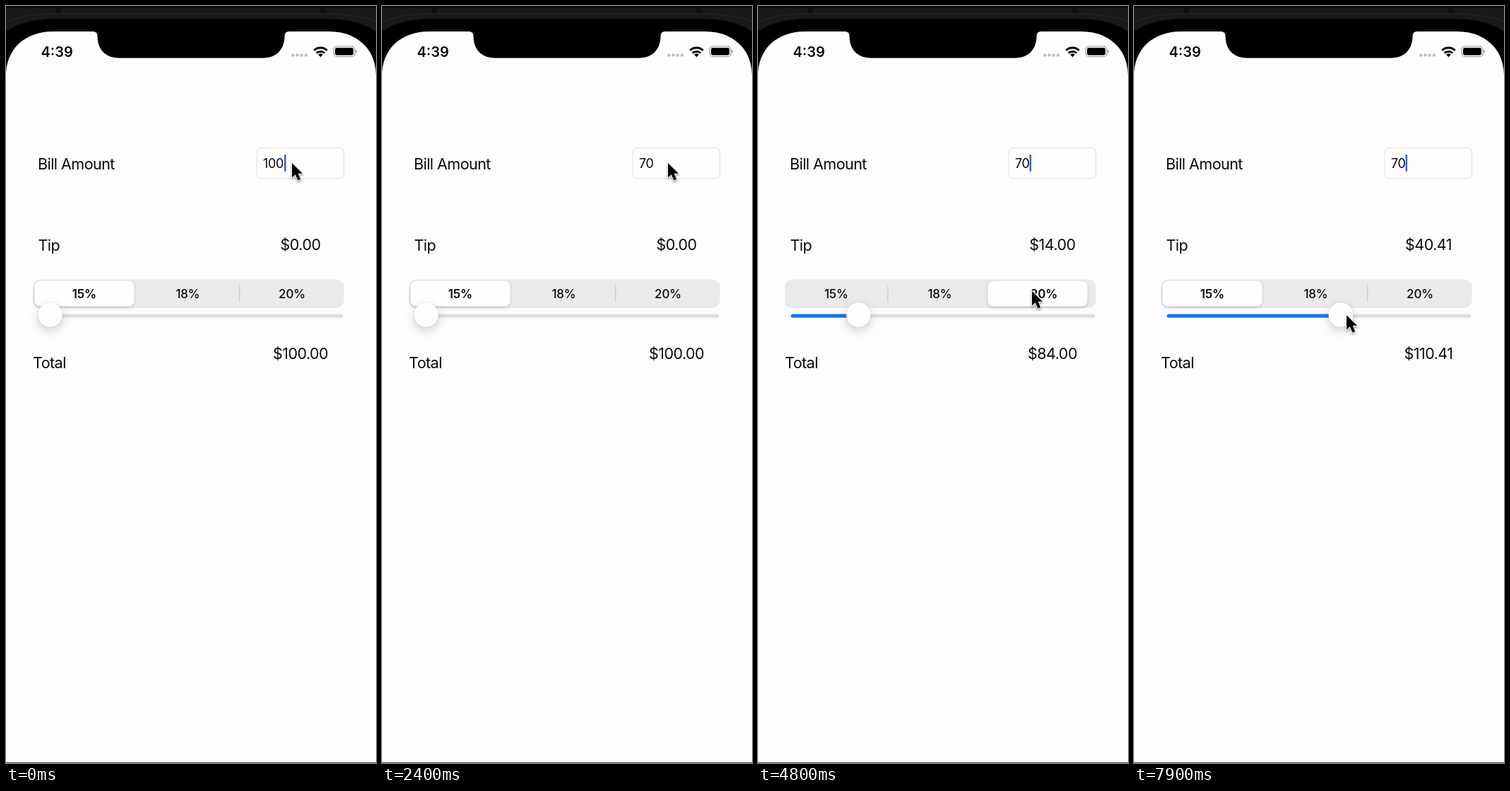
An HTML page for the animation above (8 s loop, 524x1070 px).

```html
<!DOCTYPE html>
<html lang="en">
<head>
<meta charset="utf-8">
<title>Tip calculator</title>
<style>
  html, body { margin: 0; width: 100%; height: 100%; overflow: hidden; background: #fefcfe; }
  svg { display: block; width: 100%; height: 100%; }
  text { font: 400 21.5px Inter, "Liberation Sans", sans-serif; letter-spacing: -.025em; fill: #0b0a0c; }
  .time { font-size: 20px; font-weight: 600; letter-spacing: 0; }
  .field { font-size: 18px; letter-spacing: -.02em; }
  .mid { text-anchor: middle; }
  .segment { font-size: 17px; font-weight: 500; letter-spacing: -.01em; text-anchor: middle; }
  .segment.on { font-weight: 600; }
  .pill { filter: drop-shadow(0 2px 2px rgba(0, 0, 0, .17)); }
  .thumb { filter: drop-shadow(0 5px 7px rgba(0, 0, 0, .17)) drop-shadow(0 0 1px rgba(0, 0, 0, .12)); }
  .arrow { filter: drop-shadow(0 2px 1.5px rgba(0, 0, 0, .35)); }
</style>
</head>
<body>
<svg viewBox="0 0 524 1070" preserveAspectRatio="none">
  <!-- phone body -->
  <rect width="524" height="1070" fill="#19181b"/>
  <rect width="524" height="3" fill="#0d0c0e"/>
  <path d="M70 3h8v8h-8zM445 3h8v8h-8z" fill="#0f0e11"/>
  <path d="M0 22Q30 11 70 11H454Q494 11 524 22" fill="none" stroke="#29282b"/>
  <path d="M0 36Q26 18 70 18H454Q498 18 524 36V110H0Z"/>
  <path fill="#fefcfe" d="M0 1069V98C0 62 26 36 66 36H123Q129.500 36 129.500 43C129.500 62 142 73.500 160 73.500H364C382 73.500 394.500 62 394.500 43Q394.500 36 401 36H458C498 36 524 62 524 98V1069Z"/>
  <rect y="1069" width="524" height="1" fill="#49484b"/>

  <!-- status bar -->
  <text class="time" x="49.500" y="72">4:39</text>
  <path d="M406.200 69.500h20" stroke="#bfbdc0" stroke-width="4.500" stroke-linecap="round" stroke-dasharray="0 6.200"/>
  <g fill="none" stroke="#000" stroke-width="3">
    <path d="M436.300 62.800a13 13 0 0 1 18.400 0"/>
    <path d="M439.700 66.500a8.300 8.300 0 0 1 11.600 0"/>
  </g>
  <path d="M445.500 72.200l-3.300-3.500a4.700 4.700 0 0 1 6.600 0Z"/>
  <rect x="464" y="57" width="30" height="14.500" rx="4.500" fill="none" stroke="#959397" stroke-width="1.200"/>
  <rect x="466" y="59" width="26" height="10.500" rx="2.700"/>
  <path d="M495.300 62q2 .5 2 2.300t-2 2.300Z" fill="#959397"/>

  <!-- form -->
  <text x="45" y="230.500">Bill Amount</text>
  <text x="45.500" y="346">Tip</text>
  <text x="38" y="511.500">Total</text>
  <rect x="355.500" y="200.500" width="123" height="43" rx="6" fill="#fffeff" stroke="#e4e2e8" stroke-width="1.200"/>
  <text class="field" id="bill" x="364" y="228.500"></text>
  <rect id="caret" y="210" width="2.600" height="24" rx="1" fill="#3d64da"/>
  <text class="mid" id="tip" x="417" y="344.500"></text>
  <text class="mid" id="total" x="417" y="498.800"></text>

  <rect x="38" y="386.500" width="440.500" height="40.500" rx="10" fill="#ebe9ec"/>
  <rect id="dividerA" x="183.200" y="395" width="1.300" height="23" fill="#cccace"/>
  <rect id="dividerB" x="330.200" y="395" width="1.300" height="23" fill="#cccace"/>
  <rect class="pill" id="pill" y="389" width="141" height="35.500" rx="7.500" fill="#fffeff"/>
  <text class="segment" x="110.800" y="413">15%</text>
  <text class="segment" x="257.500" y="413">18%</text>
  <text class="segment" x="405" y="413">20%</text>

  <rect x="46.500" y="435.500" width="431" height="5" rx="2.500" fill="#dfdde0"/>
  <rect id="filled" x="46.500" y="435.500" height="5" rx="2.500" fill="#0a78fb"/>
  <circle class="thumb" id="thumb" cy="436.500" r="17.300" fill="#fffeff"/>

  <path class="arrow" id="arrow" d="M0 0V20.500L4.700 16.300 8.300 24.600 12.200 22.900 8.700 14.800H15Z" stroke="#fff" stroke-width="2" paint-order="stroke" stroke-linejoin="round"/>
</svg>
<script>
const LOOP = 8000, STEP = 100;
const $ = id => document.getElementById(id);
const segments = document.querySelectorAll('.segment');
const clamp = v => Math.max(0, Math.min(1, v));
const set = (id, attrs) => {
  for (const key in attrs) $(id).setAttribute(key, attrs[key]);
};

// Field content and caret position from each moment on
const typing = [
  [0, '100', 394], [400, '10', 383.5], [600, '1', 372.2],
  [900, '', 364.5], [1700, '7', 374], [1900, '70', 384.5]
];
// Segment choices: moment, index, tip rate
const choices = [[3500, 1, .18], [4500, 2, .2], [5400, 0, .15]];
const pointer = [
  [2400, 405, 222], [3100, 245, 396], [4100, 245, 396], [4400, 388, 403],
  [5100, 388, 403], [5400, 137, 402], [6000, 137, 402], [6300, 131, 440],
  [6700, 243, 440], [6900, 247, 440], [7400, 247, 440], [7900, 301, 437]
];
const drag = [[6300, 10.5], [6700, 29.22], [6900, 31.4], [7400, 31.4], [7900, 40.41]];

const latest = (list, t) => list.filter(item => item[0] <= t).pop();

function track(keys, t, column) {
  const next = keys.findIndex(key => key[0] > t);
  if (next === 0) return keys[0][column];
  if (next < 0) return keys[keys.length - 1][column];
  const a = keys[next - 1], b = keys[next];
  const u = (t - a[0]) / (b[0] - a[0]);
  return a[column] + (b[column] - a[column]) * u * u * (3 - 2 * u);
}

// Critically damped spring from 0 to 1
function spring(ms) {
  const x = ms * .015;
  return 1 - (1 + x) * Math.exp(-x);
}

function caretOpacity(t, typedAt) {
  const phase = (t - typedAt) % 1000;
  if (t < 400) return 1;
  return clamp(1 - (phase - 350) / 150) + clamp((phase - 660) / 180);
}

function draw(now) {
  const t = Math.floor(now % LOOP / STEP) * STEP;

  const [typedAt, bill, caretX] = latest(typing, t);
  $('bill').textContent = bill;
  set('caret', { x: caretX, opacity: caretOpacity(t, typedAt) });

  let place = 0, selected = 0, tip = 0, total = 100;
  for (const [at, index, rate] of choices) {
    if (t <= at) break;
    place = selected + (index - selected) * spring(t - at);
    selected = index;
    tip = 70 * rate;
    total = 70 + tip;
  }
  if (t > drag[0][0]) {
    tip = track(drag, t, 1);
    total = 70 + tip;
  }
  $('tip').textContent = '$' + tip.toFixed(2);
  $('total').textContent = '$' + total.toFixed(2);

  set('pill', { x: 40.5 + 147 * place });
  set('dividerA', { opacity: clamp(place - 1) });
  set('dividerB', { opacity: clamp(1 - place) });
  segments.forEach((label, i) => {
    const pressed = choices.some(([at, index]) => index === i && t === at);
    label.classList.toggle('on', i === selected);
    label.setAttribute('opacity', pressed ? .65 : 1);
  });

  const thumbX = 62.5 + 5.7 * tip;
  set('thumb', { cx: thumbX });
  set('filled', { width: thumbX - 46.5 });
  set('arrow', { transform: `translate(${track(pointer, t, 1)} ${track(pointer, t, 2)})` });
}

const start = performance.now();
function frame() {
  draw(performance.now() - start);
  requestAnimationFrame(frame);
}
frame();
</script>
</body>
</html>
```
